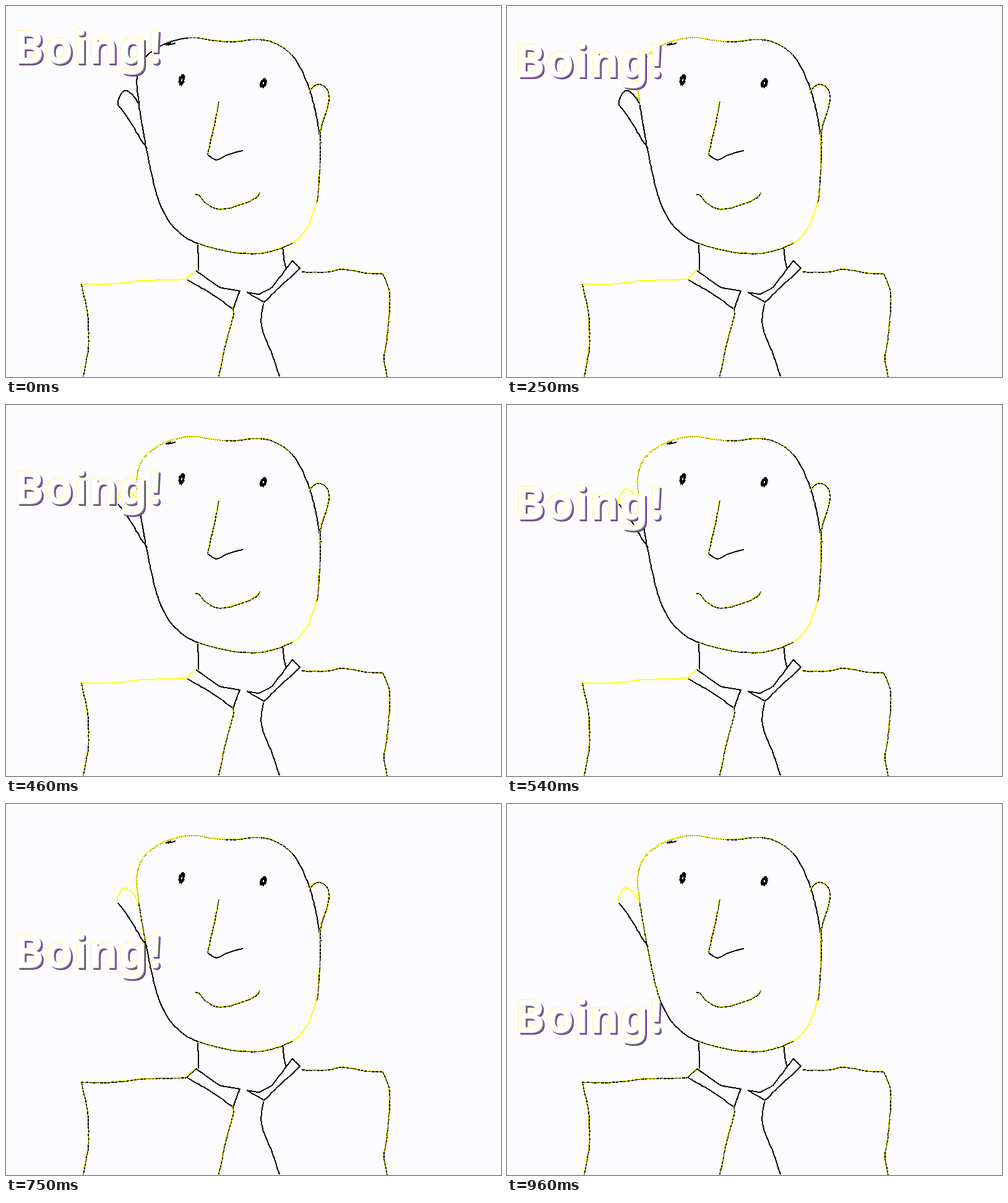
Write an HTML page that moves like this. It is 800x600 px and loops after 1 s.

```html
<!DOCTYPE html>
<html lang="en">
<head>
<meta charset="utf-8">
<title>Boing!</title>
<style>
  html, body { margin: 0; width: 100%; height: 100%; overflow: hidden; background: #fcfcff; }
  svg { display: block; width: 100vw; height: 100vh; }
  polyline { fill: none; stroke-linejoin: round; shape-rendering: crispEdges; }
  .glow { stroke: #ffff14; stroke-width: 2; }
  .line { stroke: #000; stroke-width: 2; }
  .ink .glow, .gold .line { display: none; }
  .mix .line { stroke-width: 1.5; stroke-dasharray: 5 1; }
  .sun .line { stroke-width: 1; stroke-dasharray: 1 2; }
  .scribble { stroke: #000; stroke-width: 1.6; }
  text { font: 700 73px "Noto Sans", "Open Sans", sans-serif; letter-spacing: 1.4px; }
</style>
</head>
<body>
<svg viewBox="0 0 800 600">
  <g id="man"></g>
  <g id="word"></g>
</svg>
<script>
const FRAMES = 24, LOOP = 1000;
const man = document.getElementById("man");
const word = document.getElementById("word");
const changes = [];

let seed = 7;
const random = () => (seed = seed * 16807 % 2147483647) / 2147483647;

function add(parent, tag, attrs) {
  const el = document.createElementNS("http://www.w3.org/2000/svg", tag);
  for (const key in attrs) el.setAttribute(key, attrs[key]);
  return parent.appendChild(el);
}

const parse = text => text.split(" ").map(pair => pair.split(",").map(Number));

// Direction through point i, as a unit vector
function heading(keys, i) {
  const a = keys[Math.max(i - 1, 0)], b = keys[Math.min(i + 1, keys.length - 1)];
  const d = Math.hypot(b[0] - a[0], b[1] - a[1]);
  return [(b[0] - a[0]) / d, (b[1] - a[1]) / d];
}

// Hermite curve between neighbouring key points, with a slightly shaky hand
function trace(keys, from, to, bend) {
  const out = [keys[from]];
  for (let i = from; i < to; i++) {
    const p = keys[i], q = keys[i + 1];
    const len = Math.hypot(q[0] - p[0], q[1] - p[1]);
    const m = heading(keys, i), n = heading(keys, i + 1);
    const steps = Math.ceil(len / 6);
    for (let s = 1; s <= steps; s++) {
      const t = s / steps, u = 1 - t;
      const ease = t * t * (3 - 2 * t);
      out.push([0, 1].map(c => {
        const smooth = p[c] + (q[c] - p[c]) * ease + len * (t * u * u * m[c] - t * t * u * n[c]);
        const straight = p[c] + (q[c] - p[c]) * t;
        const shake = s < steps ? random() - 0.5 : 0;
        return (bend ? smooth : straight) + shake;
      }));
    }
  }
  return out.map(p => p.map(v => v.toFixed(1))).join(" ");
}

// Dark line over a yellow one; the style may change at a given step
function pen(keys, style, { from = 0, to = keys.length - 1, bend = true, step, after } = {}) {
  const g = add(man, "g", { class: style });
  const points = trace(keys, from, to, bend);
  add(g, "polyline", { class: "glow", points, transform: "translate(-.8 -.8)" });
  add(g, "polyline", { class: "line", points });
  if (after) changes.push({ g, step, before: style, after });
}
const curve = (text, style, options) => pen(parse(text), style, options);
const edge = (text, style, options) => pen(parse(text), style, { ...options, bend: false });

// Head, clockwise from the left ear
const head = parse("227,232 215,160 213,108 235,74 290,52 355,58 421,56 462,79 491,137 507,215 " +
  "506,285 502,318 487,360 463,384 400,401 310,384 272,359 249,321 235,270 227,232");
pen(head, "ink", { from: 0, to: 1, step: 18, after: "mix" });
pen(head, "ink", { from: 1, to: 4, step: 6, after: "sun" });
pen(head, "mix", { from: 4, to: 5, step: 1, after: "sun" });
pen(head, "mix", { from: 5, to: 7 });
pen(head, "ink", { from: 7, to: 9 });
pen(head, "mix", { from: 9, to: 11 });
pen(head, "gold", { from: 11, to: 13 });
pen(head, "mix", { from: 13, to: 15 });
pen(head, "ink", { from: 15, to: 17 });
pen(head, "ink", { from: 17, to: 19, step: 21, after: "mix" });
edge("258,63 266,60 262,63 274,60", "ink");

// Ears
curve("214,158 204,143 191,137 181,153 181,160", "ink", { step: 11, after: "gold" });
curve("181,160 200,186 216,213 228,231", "ink");
curve("491,141 496,131 508,127 521,138 521,158 512,188 508,207 509,222", "mix");

// Eyes: a leaning scribble
function eye(x, y, w, h) {
  const points = Array.from({ length: 34 }, (_, i) => {
    const a = i * 2.2, r = 0.7 + 0.3 * random(), dy = h * r * Math.sin(a);
    return [x + w * r * Math.cos(a) - dy * 0.2, y + dy].map(v => v.toFixed(1));
  }).join(" ");
  add(man, "polyline", { class: "scribble", points });
}
eye(284, 120, 5, 9.5);
eye(416, 125, 5.5, 8);

// Nose and mouth
curve("344,155 339,182 326,240", "mix");
curve("326,241 340,249 357,241 383,234", "ink");
curve("306,305 312,306 323,319 345,329 380,321 405,310 410,302", "mix");

// Neck, collar and tie
edge("310,386 311,428", "ink");
curve("447,390 449,409 453,426", "ink");
edge("292,443 307,428", "gold", { step: 18, after: "mix" });
edge("307,428 345,455 378,461 367,490 330,464 293,443", "ink");
edge("389,463 410,466 430,455 463,412 475,424 417,479 389,463", "ink");
curve("367,490 368,498 356,543 344,599", "mix");
curve("416,481 413,517 430,563 442,599", "ink");

// Shirt
curve("122,450 165,451 222,445 291,443", "gold", { step: 18, after: "mix" });
curve("122,450 132,500 133,553 125,599", "mix");
curve("478,430 490,431 521,430 545,426 580,432 609,433", "mix");
curve("609,433 620,465 615,545 611,570 616,600", "mix");

// Bevelled lettering, back to front
const layers = [["#fff68c", -1], ["#5a14a8", 3], ["#7c7c74", 2], ["#fff", 0]];
for (const [fill, shift] of layers)
  add(word, "text", { x: 12.5 + shift, y: 93 + shift, fill }).textContent = "Boing!";

const startOf = k => Math.round(k * LOOP / FRAMES / 10) * 10;

function draw(time) {
  let k = FRAMES - 1;
  while (startOf(k) > time) k--;
  const fall = 0.495 * k * k + 0.655 * k;
  word.setAttribute("transform", `translate(0 ${fall.toFixed(2)})`);
  for (const { g, step, before, after } of changes)
    g.setAttribute("class", k < step ? before : after);
}

const begin = performance.now();
function tick() {
  draw((performance.now() - begin) % LOOP);
  requestAnimationFrame(tick);
}
tick();
</script>
</body>
</html>
```
